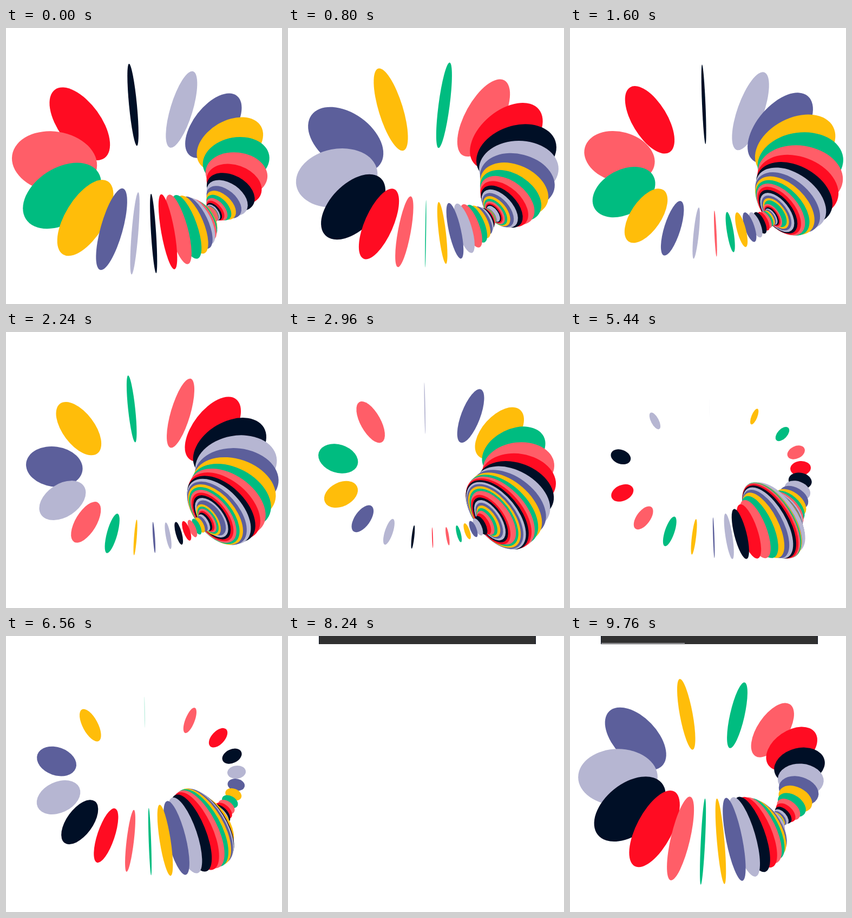
These frames come from a looping animation (510x509 px, 9840 ms). An HTML page with a canvas:

```html
<!DOCTYPE html>
<html lang="en">
<head>
<meta charset="utf-8">
<title>Disc ring</title>
<style>
  html, body { margin: 0; width: 100%; height: 100%; overflow: hidden; background: #fff; }
  canvas { display: block; }
</style>
</head>
<body>
<canvas id="stage" width="510" height="509"></canvas>
<script>
const ctx = document.getElementById('stage').getContext('2d');
const LOOP = 9840, STEP = 80;
const COUNT = 40;
const CX = 257.5, CY = 260, RING = 169, TILT = Math.SQRT1_2;
const FOCUS = Math.PI / 4; // where the discs crowd together
const COLORS = ['#b6b6d2', '#5c5f9b', '#ffbd0a', '#00bc80', '#ff5e68', '#ff0c22', '#000f26'];
const RATE = 0.3563 / STEP;
const PAUSE = 7520, BLANK = 8240, RESUME = 8640, LAST = 9760;

// Travel along the ring, counted in disc slots
function travel(t) {
  const start = -12.02, held = start + PAUSE * RATE, end = 24.785;
  if (t < PAUSE) return start + t * RATE;
  if (t < RESUME) return held;
  return held + (end - held) * (t - RESUME) / (LAST - RESUME);
}

// Exponential crowding towards the focus, slightly softer far away from it
function ringAngle(u) {
  const d = Math.abs(u);
  const gap = Math.PI * Math.exp(0.06 * (1 - Math.exp(-d / 2)) - 0.26 * d);
  return u < 0 ? FOCUS + gap : FOCUS - gap;
}

function discs(t) {
  const shift = travel(t), half = COUNT / 2;
  return Array.from({ length: COUNT }, (_, i) => {
    const u = ((i + shift + half) % COUNT + COUNT) % COUNT - half;
    const angle = ringAngle(u);
    return {
      cos: Math.cos(angle),
      sin: Math.sin(angle),
      radius: 47.5 + 32 * Math.sin(2 * Math.PI * i / COUNT),
      color: COLORS[i % COLORS.length]
    };
  }).sort((a, b) => a.sin - b.sin);
}

function drawDisc({ cos, sin, radius, color }) {
  const turn = Math.atan2(TILT * cos, -sin) + Math.PI / 2;
  ctx.fillStyle = color;
  ctx.beginPath();
  ctx.ellipse(CX + RING * cos, CY + RING * TILT * sin,
    radius, radius * TILT * Math.abs(cos), turn, 0, 2 * Math.PI);
  ctx.fill();
}

function drawBar(t) {
  ctx.fillStyle = '#0a1222';
  ctx.fillRect(57, 0, 401, 15);
  ctx.fillStyle = '#303030';
  ctx.fillRect(58, 0, 399, 15);
  if (t >= RESUME) {
    ctx.fillStyle = '#dcdce4';
    ctx.fillRect(58, 13, 154 * (t - RESUME + STEP) / (LAST - RESUME + STEP), 1);
  }
}

function frame() {
  const t = Math.floor(performance.now() % LOOP / STEP) * STEP;
  ctx.fillStyle = '#fff';
  ctx.fillRect(0, 0, 510, 509);
  if (t < BLANK || t >= RESUME) discs(t).forEach(drawDisc);
  if (t >= 7920) drawBar(t);
  requestAnimationFrame(frame);
}
frame();
</script>
</body>
</html>
```
